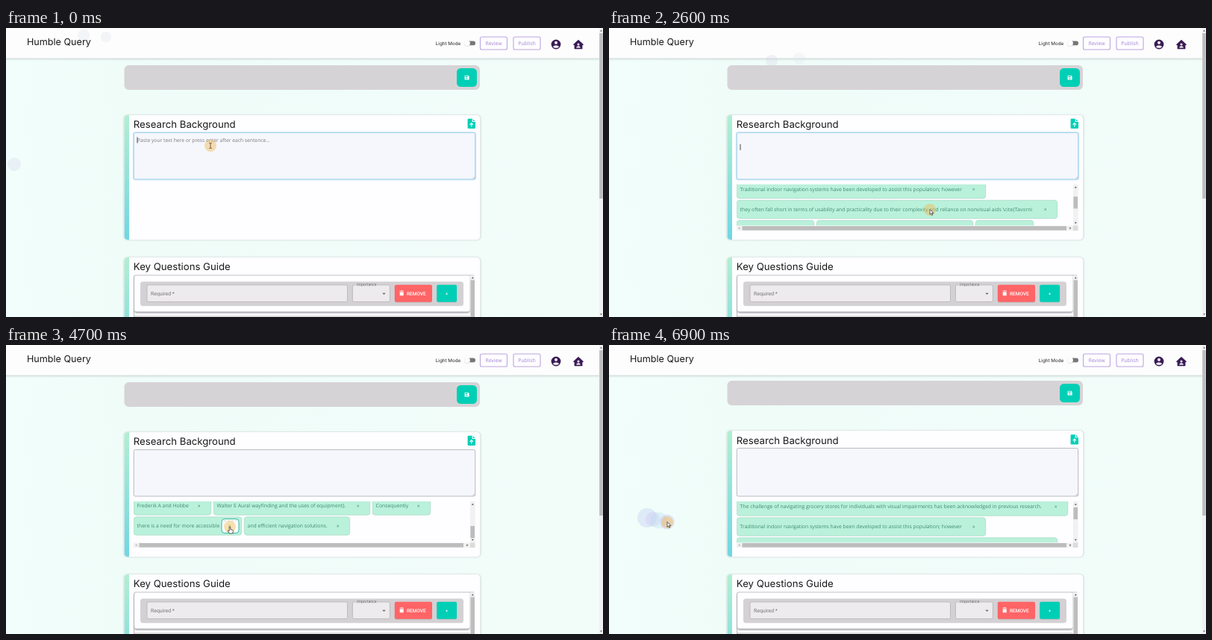
Write an HTML page that moves like this. It is 800 px wide and 388 px high and loops after 7000 ms.

```html
<!DOCTYPE html>
<html lang="en">
<head>
<meta charset="utf-8">
<title>Survey editor</title>
<style>
html, body { margin: 0; width: 100%; height: 100%; overflow: hidden; background: #f0fcf9; }
svg { display: block; width: 100vw; height: 100vh; }
text { font-family: "Open Sans", sans-serif; font-size: 6.83px; fill: #222; text-rendering: geometricPrecision; white-space: pre; }
.head { font-family: Inter, sans-serif; font-size: 13.2px; fill: #191919; }
.lilac { fill: #a384d4; }
.tag text { fill: #3f8b70; }
.bar { fill: #f1f1f1; }
.thumb { fill: #bdbdbd; }
.tri { fill: #555; }
</style>
</head>
<body>
<svg id="stage" viewBox="0 0 800 388" preserveAspectRatio="none">
  <defs>
    <linearGradient id="page"><stop offset="0" stop-color="#f2fefb"/><stop offset=".2" stop-color="#effcf8"/><stop offset="1" stop-color="#f2fdfa"/></linearGradient>
    <linearGradient id="stripe" x1="0" y1="0" x2="0" y2="1"><stop offset="0" stop-color="#b1efd2"/><stop offset="1" stop-color="#70d6e2"/></linearGradient>
    <linearGradient id="fade" x1="0" y1="0" x2="0" y2="1"><stop offset="0" stop-color="#b9c6c6" stop-opacity=".7"/><stop offset="1" stop-color="#b9c6c6" stop-opacity="0"/></linearGradient>
    <filter id="soft" x="-10%" y="-10%" width="120%" height="120%"><feGaussianBlur stdDeviation="1.3"/></filter>
    <clipPath id="view"><rect x="171" y="210" width="451" height="55.5"/></clipPath>
    <clipPath id="cardClip"><rect id="cardMask" x="158.5" width="477" rx="5"/></clipPath>
    <clipPath id="guideClip"><rect x="158.5" y="308" width="477" height="160" rx="5"/></clipPath>
  </defs>

  <rect width="800" height="388" fill="url(#page)"/>
  <rect y="40" width="795" height="4" fill="url(#fade)"/>
  <rect width="795" height="40.5" fill="#fdfdfe"/>
  <g id="bubbles"></g>

  <!-- header -->
  <text class="head" x="28" y="23.4" style="font-size:12.6px">Humble Query</text>
  <text x="575.8" y="22.7" style="font-family:Inter,sans-serif;font-size:6.3px" fill="#333">Light Mode</text>
  <rect x="616" y="17.6" width="13" height="5.6" rx="2.8" fill="#777"/>
  <circle cx="618" cy="20.8" r="4" fill="#aaa" opacity=".5"/>
  <circle cx="618" cy="20.4" r="3.8" fill="#fdfdfd"/>
  <g fill="#fefdff" stroke="#bca6e2" stroke-width="1.1">
    <rect x="635.5" y="12" width="36" height="17" rx="2"/>
    <rect x="680" y="12" width="36" height="17" rx="2"/>
  </g>
  <text class="lilac" x="653.5" y="23" text-anchor="middle">Review</text>
  <text class="lilac" x="698" y="23" text-anchor="middle">Publish</text>
  <g fill="#3a1b55">
    <circle cx="737" cy="22" r="6.4"/>
    <path d="M760 22.2 767 15.8 774 22.2 773 23.2 772.4 22.7V28.2H761.6V22.7L761 23.2Z"/>
  </g>
  <g fill="#fdfdfe">
    <circle cx="737" cy="19.8" r="2"/>
    <path d="M733 25.3C734 22.8 740 22.8 741 25.3 739 27.3 735 27.3 733 25.3Z"/>
    <circle cx="767" cy="22" r="1.5"/>
    <path d="M764.2 26.5C764.6 23.6 769.4 23.6 769.8 26.5Z"/>
  </g>

  <!-- toolbar -->
  <g id="tools">
    <rect x="158.5" y="50" width="476.5" height="33" rx="6" fill="#d6d3d6"/>
    <rect x="604" y="54" width="27" height="25" rx="5.5" fill="#00cfb6"/>
    <path d="M614.6 63.7H619.4L620.6 64.9V69.5H614.6Z" fill="#fff"/>
    <path d="M615.4 64.5H618.7V65.9H615.4Z" fill="#00cfb6"/>
    <circle cx="617.6" cy="67.7" r=".9" fill="#00cfb6"/>
  </g>

  <!-- background card -->
  <rect id="cardShade" x="158" width="478" rx="5" fill="#bfc5c5" filter="url(#soft)"/>
  <rect id="card" x="158.5" width="477" rx="5" fill="#fefdff"/>
  <rect id="cardStripe" x="158.5" width="6.5" fill="url(#stripe)" clip-path="url(#cardClip)"/>
  <g id="cardTop">
    <text class="head" x="170.8" y="134.2">Research Background</text>
    <path d="M619.8 121.7H625.2L629 125.5V133.8Q629 135 627.8 135H619.8Q618.6 135 618.6 133.8V122.9Q618.6 121.7 619.8 121.7Z" fill="#00cfb6"/>
    <path d="M625.2 121.7V125.5H629M623.8 132.6V128M621.6 129.8 623.8 127.6 626 129.8" fill="none" stroke="#fff" stroke-width="1.1"/>
  </g>
  <rect id="glow" x="171" width="458" rx="2.5" fill="none" stroke="#a5d8f2" stroke-width="2.4" opacity=".55"/>
  <rect id="area" x="171.3" width="457.4" rx="2" fill="#f5f7fc" stroke-width=".9"/>
  <path d="M625.3 202.3 628 199.6M627 202.3 628 201.3" stroke="#888" stroke-width=".5"/>
  <text id="hint" x="176" y="152.6" style="font-size:6.74px;fill:#7a7a7a">Paste your text here or press enter after each sentence...</text>
  <g id="pasted">
    <g id="lines"></g>
    <rect class="bar" x="622" y="141.2" width="6.3" height="54"/>
    <rect class="thumb" x="622" y="149" width="5.5" height="36.5"/>
    <path class="tri" d="M623.4 146 624.9 144 626.4 146ZM623.4 191 624.9 193 626.4 191Z"/>
    <rect x="622" y="195.2" width="6.3" height="7.3" fill="#dcdcdc"/>
    <path d="M624.3 201.8 627.8 198.3M626.2 201.8 627.8 200.2" stroke="#777" stroke-width=".5"/>
  </g>
  <rect id="caret" x="175.6" width=".8" height="8" fill="#222"/>

  <!-- tags -->
  <g id="list">
    <g id="tags" clip-path="url(#view)"></g>
    <rect class="bar" x="622" y="210" width="6.6" height="55.5"/>
    <rect id="thumb" class="thumb" x="622.4" width="5.6" height="16"/>
    <path class="tri" d="M623.8 214.8 625.3 212.8 626.8 214.8ZM623.8 260.8 625.3 262.8 626.8 260.8Z"/>
    <rect class="bar" x="171" y="265.5" width="451" height="6.5"/>
    <rect class="thumb" x="178.5" y="266" width="434.5" height="5.6"/>
    <path d="M175.3 267.3 173.3 268.8 175.3 270.3Z" fill="#aaa"/>
    <path class="tri" d="M617.3 267.3 619.3 268.8 617.3 270.3Z"/>
    <rect x="622" y="265.5" width="6.6" height="6.5" fill="#dcdcdc"/>
  </g>

  <!-- question guide -->
  <rect x="158" y="308" width="478" height="160" rx="5" fill="#bfc5c5" filter="url(#soft)"/>
  <rect x="158.5" y="308" width="477" height="160" rx="5" fill="#fefdff"/>
  <rect x="158.5" y="308" width="6.5" height="160" fill="url(#stripe)" clip-path="url(#guideClip)"/>
  <text class="head" x="170.8" y="325.2">Key Questions Guide</text>
  <path d="M171.5 388V334Q171.5 332 173.5 332H627" fill="none" stroke="#a9a9ad" stroke-width=".8"/>
  <rect x="172" y="333.4" width="449.5" height="49" rx="3" fill="#9b9b9f" filter="url(#soft)"/>
  <rect x="172" y="332.4" width="449.5" height="48.4" rx="3" fill="#fefdff"/>
  <path d="M172 390V387H621V390" fill="#fefdff" stroke="#aaa" stroke-width=".8"/>
  <rect class="bar" x="622" y="332.4" width="6.3" height="56"/>
  <rect class="thumb" x="622.5" y="338.5" width="5.5" height="50"/>
  <path class="tri" d="M623.8 336.3 625.3 334.3 626.8 336.3Z"/>
  <rect x="180" y="340.5" width="433" height="32.8" rx="3.5" fill="#d4d1d4"/>
  <g fill="#edebed" stroke="#b7b4b7" stroke-width=".8">
    <rect x="189" y="345" width="268.5" height="22.6" rx="2"/>
    <rect x="464.4" y="345" width="50" height="22.6" rx="2"/>
  </g>
  <rect x="468.5" y="343.6" width="28" height="3" fill="#dedbde"/>
  <text x="194" y="358.7" style="font-family:Roboto,sans-serif;font-size:6.9px;fill:#757575">Required *</text>
  <text x="470" y="346.3" style="font-family:Roboto,sans-serif;font-size:5.2px;fill:#666">Importance</text>
  <path d="M504.3 355.7H508.7L506.5 357.9Z" fill="#666"/>
  <rect x="521" y="345.6" width="50" height="23" rx="2" fill="#b9a5a7"/>
  <rect x="577.3" y="345.6" width="26.8" height="23" rx="2" fill="#a5b9b6"/>
  <rect x="520.8" y="344.8" width="50.2" height="22.9" rx="2" fill="#ff6466"/>
  <rect x="577.2" y="344.8" width="26.9" height="22.9" rx="2" fill="#00cfb6"/>
  <path d="M527.7 354.4H532.7V359.3H527.7ZM527.4 352.7H529L529.4 352.2H531L531.4 352.7H533V353.6H527.4Z" fill="#fff"/>
  <text x="537" y="358.6" style="font-family:Roboto,sans-serif;font-size:6.5px;font-weight:500;fill:#fff">REMOVE</text>
  <path d="M589.2 356.9H592M590.6 355.5V358.3" stroke="#fff" stroke-width=".7"/>

  <!-- page scrollbar -->
  <rect class="bar" x="794.8" width="5.2" height="388"/>
  <rect class="thumb" x="795.2" y="7" width="4.6" height="222"/>
  <path class="tri" d="M796.2 4.4 797.5 2.6 798.8 4.4ZM796.2 383.6 797.5 385.4 798.8 383.6Z"/>

  <!-- pointer -->
  <circle id="halo" r="8" fill="#f1bd5c" opacity=".48"/>
  <path id="beam" d="M-1.8-3.6Q-.4-3.6 0-3Q.4-3.6 1.8-3.6M0-3V3M-1.8 3.6Q-.4 3.6 0 3Q.4 3.6 1.8 3.6" fill="none" stroke="#4a3a2c" stroke-width=".8"/>
  <path id="arrow" d="M0-.5V6.4L1.6 4.9 2.7 7.4 3.8 6.9 2.7 4.5H4.9Z" fill="#fff" stroke="#222" stroke-width=".7"/>
  <path id="hand" d="M-.8 0Q-.8-1 0-1T.8 0V2.7L3.7 3.4Q4.6 3.7 4.4 4.7L3.7 8H-.5L-2.8 4.9Q-2.9 3.8-1.8 4.2L-.8 5Z" fill="#fff" stroke="#222" stroke-width=".7"/>
</svg>
<script>
const LOOP = 7000, STEP = 100;
const PASTE = 1400, SPLIT = 2000, CUT_A = 4200, CUT_B = 4900, NUDGE = 6800;
const $ = id => document.getElementById(id);
const NS = "http://www.w3.org/2000/svg";

function add(parent, name, attrs, text) {
  const el = parent.appendChild(document.createElementNS(NS, name));
  set(el, attrs);
  if (text) el.textContent = text;
  return el;
}
function set(el, attrs) { for (const k in attrs) el.setAttribute(k, attrs[k]); }
function show(el, on) { el.style.display = on ? "" : "none"; }
function move(el, x, y) { el.setAttribute("transform", `translate(${x} ${y})`); }

// Eased position between [time, ...values] stops.
function track(stops, t) {
  let i = 0;
  while (i < stops.length - 1 && stops[i + 1][0] <= t) i++;
  const a = stops[i], b = stops[i + 1] || a;
  const p = b === a ? 0 : Math.max(0, (t - a[0]) / (b[0] - a[0]));
  const e = p * p * (3 - 2 * p);
  return a.slice(1).map((v, k) => v + (b[k + 1] - v) * e);
}

[
  "The challenge of navigating grocery stores for individuals with visual impairments has been acknowledged in previous research.",
  "Traditional indoor navigation systems have been developed to assist this population; however, they often fall short in terms of usability",
  "and practicality due to their complexity and reliance on nonvisual aids \\cite{Tavorni, Frederik A and Hobbe, Walter E Aural wayfinding and",
  "the uses of equipment}. Consequently, there is a need for more accessible, user-friendly, and efficient navigation solutions."
].forEach((s, i) => add($("lines"), "text", { x: 176, y: 150.5 + i * 10 }, s));

// row, left, width, label
const tags = [
  [0, 171, 444, "The challenge of navigating grocery stores for individuals with visual impairments has been acknowledged in previous research."],
  [1, 171, 334, "Traditional indoor navigation systems have been developed to assist this population; however"],
  [2, 171, 430, "they often fall short in terms of usability and practicality due to their complexity and reliance on nonvisual aids \\cite{Tavorni"],
  [3, 171, 104, "Frederik A and Hobbe"],
  [3, 278, 210, "Walter E Aural wayfinding and the uses of equipment}."],
  [3, 491, 78, "Consequently"],
  [4, 171, 145, "there is a need for more accessible"],
  [4, 319, 74, "user-friendly"],
  [4, 396, 142, "and efficient navigation solutions."]
].map(([row, x, w, label]) => {
  const g = add($("tags"), "g", { class: "tag" });
  add(g, "rect", { x: .3, y: -12.2, width: w - .6, height: 24.4, rx: 3.5, fill: "#baf1db", stroke: "#a5d9c5", "stroke-width": .7 });
  const hover = add(g, "g", {});
  add(hover, "rect", { x: w - 27, y: -9.5, width: 23, height: 19, rx: 4, fill: "#fff", stroke: "#32b8a0", "stroke-width": 1 });
  add(hover, "path", { d: `M${w - 24} -7H${w - 7}`, stroke: "#aaa", "stroke-width": .6, "stroke-dasharray": "3 2" });
  add(g, "text", { x: 4.6, y: 2.4 }, label);
  add(g, "path", { d: `M${w - 17.6} -1.2l2.6 2.6m0 -2.6l-2.6 2.6`, stroke: "#3f8b70", "stroke-width": .7 });
  return { g, hover, row, x };
});

const pointer = [
  [0, 274, 158], [800, 308, 161], [1100, 327, 155], [1900, 327, 155], [2300, 430, 244],
  [2900, 430, 244], [3700, 381, 247], [4200, 381, 247], [4700, 300, 244], [4900, 300, 244],
  [5300, 566, 233], [6100, 566, 233], [6700, 50, 236], [6900, 78, 238]
];
const scroll = [
  [0, 222], [2200, 222], [2500, 189.5], [2900, 189.5], [3500, 135], [5400, 135], [5800, 206], [6100, 217]
];

// x, y at birth, birth, death, radius, colour, opacity
const bubbles = [
  [11, 183, 0, 1200, 9, "#cfc6e8", .25],
  [104, 10, 0, 100, 8, "#dfe3ea", .35],
  [134, 12, 0, 100, 7, "#dfe3ea", .35],
  [218, 58, 2200, 2900, 8, "#d5d3e6", .3],
  [255, 55, 2200, 2900, 8, "#d9e6ea", .25],
  [15, 9, 3900, 4200, 6, "#e2e6ea", .25],
  [393, 39, 4800, 6100, 9.5, "#d5dde3", .4],
  [345, 36, 4800, 5700, 7, "#e2e6ea", .3],
  [51, 239, 6700, 7000, 13, "#b9c3f2", .32],
  [59, 241, 6700, 7000, 10, "#c9bdf0", .3],
  [67, 239, 6800, 7000, 11, "#b5dcf0", .32],
  [78, 241, 6800, 7000, 10, "#c5b6f0", .35]
].map(([x, y, from, to, r, fill, opacity]) =>
  ({ el: add($("bubbles"), "circle", { cx: x, r, fill, opacity }), y, from, to }));

function draw(t) {
  const lift = t >= NUDGE ? 2 : 0;
  move($("tools"), 0, -lift);
  move($("cardTop"), 0, -lift * .75);
  const box = { y: 117 - lift, height: 167.5 + lift };
  for (const id of ["card", "cardMask", "cardStripe", "cardShade"]) set($(id), box);

  const focus = t < CUT_A;
  set($("area"), { y: 140.6 - lift, height: 62.4 + lift, stroke: focus ? "#9ccfe8" : "#b3b3b9" });
  set($("glow"), { y: 140.4 - lift, height: 62.8 + lift });
  show($("glow"), focus);
  show($("hint"), t < PASTE);
  show($("pasted"), t >= PASTE && t < SPLIT);
  show($("caret"), t < PASTE && t % 1000 < 500 || t >= SPLIT && t < 3600 && (t - SPLIT) % 1000 >= 500);
  set($("caret"), { y: t < PASTE ? 146.5 : 156 });

  const [top] = track(scroll, t);
  show($("list"), t >= SPLIT);
  set($("thumb"), { y: 218 + (217 - top) * .305 });
  tags.forEach((tag, i) => {
    let x = tag.x;
    if (i === 7 && t >= CUT_B) x -= 148;
    if (i === 8) x -= (t >= CUT_A ? 77 : 0) + (t >= CUT_B ? 148 : 0);
    show(tag.g, !(i === 7 && t >= CUT_A || i === 6 && t >= CUT_B));
    show(tag.hover, i === 7 && t >= 3600 || i === 6 && t >= 4600);
    move(tag.g, x, top + tag.row * 27);
  });

  for (const b of bubbles) {
    show(b.el, t >= b.from && t < b.to);
    set(b.el, { cy: b.y - (t - b.from) * .035 });
  }

  const [x, y] = track(pointer, t);
  const beam = t < SPLIT;
  const hand = t >= 3600 && t < CUT_A || t >= 4600 && t < CUT_B;
  set($("halo"), { cx: x, cy: y });
  move($("beam"), x, y);
  move($("arrow"), x, y);
  move($("hand"), x, y + 1);
  show($("beam"), beam);
  show($("hand"), hand);
  show($("arrow"), !beam && !hand);
}

const start = performance.now();
function tick() {
  const t = (performance.now() - start) % LOOP;
  draw(Math.floor(t / STEP) * STEP);
  requestAnimationFrame(tick);
}
tick();
</script>
</body>
</html>
```
